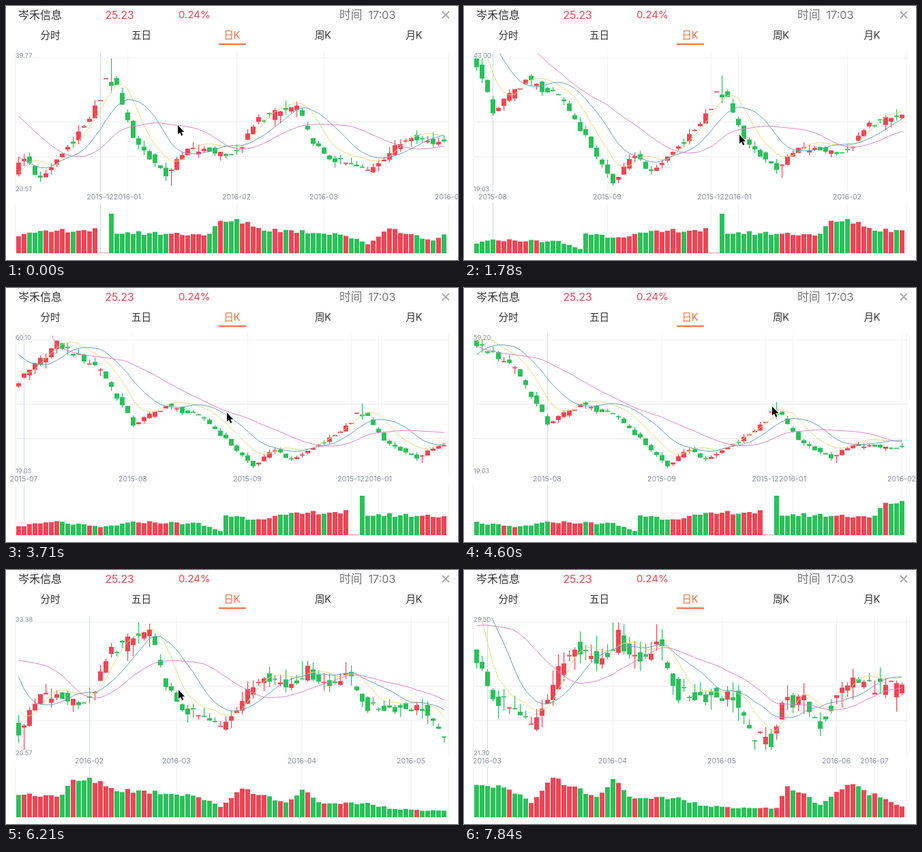
Animation of 663x373 px, one loop 8.43 s. Source, as an HTML page with a canvas:

```html
<!DOCTYPE html>
<html lang="zh">
<head>
<meta charset="utf-8">
<style>
  html, body { margin: 0; width: 663px; height: 373px; overflow: hidden; background: #fff; }
  canvas, svg { position: absolute; left: 0; top: 0; display: block; }
  text { font-family: Inter, "Noto Sans CJK SC", "Noto Sans CJK", sans-serif; fill: #333; }
  .tab { font-size: 14.5px; text-anchor: middle; }
  .quote { fill: #ee4655; }
  .time { fill: #777; }
</style>
</head>
<body>
<canvas id="chart" width="663" height="373"></canvas>
<svg width="663" height="373">
  <text x="18" y="18.5" font-size="16">岑禾信息</text>
  <text class="quote" x="145.5" y="18.5" font-size="15.7">25.23</text>
  <text class="quote" x="253" y="18" font-size="15">0.24%</text>
  <text class="time" x="489" y="18.5" font-size="16.8">时间</text>
  <text class="time" x="531.5" y="18.5" font-size="16.2">17:03</text>
  <path d="M640 8l10 10m0-10l-10 10" stroke="#aaa" stroke-width="1.8" fill="none"/>
  <text class="tab" x="65" y="47.5">分时</text>
  <text class="tab" x="198.5" y="47.5">五日</text>
  <text class="tab" x="331.5" y="47.5" style="fill:#f2703f">日K</text>
  <text class="tab" x="465" y="47.5">周K</text>
  <text class="tab" x="598.5" y="47.5">月K</text>
  <rect x="312" y="55" width="40" height="2" fill="#f2703f"/>
</svg>
<script>
const ctx = document.getElementById('chart').getContext('2d');
const LOOP = 8430, TICK = 148, COUNT = 196, VISIBLE = 79, FIRST_DAY = 63;
const PITCH = 8, FIRST_X = 18, LEFT = 14, RIGHT = 649;
const PRICE = { top: 67, high: 77, low: 264, bottom: 273 };
const VOLUME = { top: 289, height: 58, bottom: 363 };
const RED = '#ee4655', GREEN = '#2bc05a';
const AVERAGES = [[5, '#e5dc7c'], [10, '#66a2bd'], [20, '#d887c8']];
const AVERAGE_LIFT = 9;

const MONTHS = {
  18: '2015-07', 38: '2015-08', 59: '2015-09', 78: '2015-12', 83: '2016-01', 103: '2016-02',
  119: '2016-03', 142: '2016-04', 162: '2016-05', 183: '2016-06', 190: '2016-07'
};

// Turning points of the price and of the traded volume, by day
const PRICE_TREND = [
  [-20, 121], [-6, 123], [-4, 146], [4, 139], [5, 71], [16, 45], [24, 59], [32, 51], [38, 33],
  [44, 39], [51, 35], [60, 19.5], [64, 25], [67, 21.4], [74, 28.5], [78, 33.5], [79, 36.8],
  [81, 35.7], [84, 27.5], [90, 22.3], [94, 26], [103, 25.4], [107, 30.6], [114, 32.5],
  [116, 28.6], [119, 25], [127, 22.9], [135, 28.3], [139, 27], [143, 28.5], [147, 27],
  [150, 28.4], [154, 24.8], [164, 24.8], [167, 22.3], [171, 21.8], [173, 24.4], [177, 24.4],
  [180, 22.9], [185, 25.7], [195, 25.2]
];
const VOLUME_TREND = [
  [0, 5], [16, 5], [17, 15], [24, 22], [32, 13], [39, 22], [50, 19], [54, 7], [55, 33], [60, 27],
  [72, 38], [79, 38], [80, 61], [81, 34], [98, 31], [100, 52], [105, 52], [107, 40], [122, 32],
  [127, 15], [131, 42], [139, 20], [142, 40], [146, 18], [154, 20], [159, 11], [172, 9],
  [174, 33], [180, 13], [185, 34], [195, 12]
];
// Peaks and lows that set the price axis
const EXTREMES = [
  [0, 156.5], [25, 59.2], [35, 43], [60, 19.03], [80, 39.77],
  [91, 20.57], [114, 33.25], [142, 29.5], [171, 21.3]
];
// Days that open at the daily limit and hardly trade
const LIMIT_DAYS = [78, 79];

// Tick, x, y and whether the chart is dragged on the way there
const POINTER = [
  [0, 252, 175], [4, 168, 172], [5, 168, 172], [6, 180, 174], [12, 404, 189, true],
  [14, 460, 190, true], [16, 233, 186], [20, 457, 188, true], [21, 457, 188],
  [27, 257, 180, true], [31, 452, 174], [36, 172, 176, true], [38, 412, 174],
  [41, 172, 176, true], [44, 415, 175], [47, 263, 177, true], [49, 199, 184, true],
  [52, 230, 352], [53, 240, 400]
];

const mix = (a, b, k) => a + (b - a) * k;
const clamp = (v, lo, hi) => Math.max(lo, Math.min(hi, v));

function noise(i, salt) {
  const v = Math.sin(i * 12.9898 + salt * 78.233) * 43758.5453;
  return v - Math.floor(v);
}
const jitter = (i, salt, amount) => 1 + (noise(i, salt) * 2 - 1) * amount;

function along(points, at) {
  const next = points.findIndex(p => p[0] > at);
  if (next < 0) return points[points.length - 1][1];
  const [x0, y0] = points[next - 1], [x1, y1] = points[next];
  return mix(y0, y1, (at - x0) / (x1 - x0));
}

function makeDay(i) {
  const trend = along(PRICE_TREND, i);
  if (LIMIT_DAYS.includes(i)) return { open: trend, close: trend, high: trend, low: trend, volume: 0.6 };
  const change = clamp(trend / along(PRICE_TREND, i - 1) - 1, -0.1, 0.1);
  const close = trend * jitter(i, 1, 0.02);
  const open = trend / (1 + change * 0.8) * jitter(i, 2, 0.025);
  const high = Math.max(open, close) * (1 + noise(i, 3) ** 2 * 0.04);
  const low = Math.min(open, close) * (1 - noise(i, 4) ** 2 * 0.04);
  return { open, close, high, low, volume: along(VOLUME_TREND, i) * jitter(i, 5, 0.1) };
}

function makeDays() {
  const days = Array.from({ length: COUNT }, (_, i) => makeDay(i));
  for (const [at, price] of EXTREMES) {
    const peak = price > days[at].close;
    const limit = peak ? Math.min : Math.max;
    for (const d of days.slice(peak ? at : at - 25, at + 25)) {
      for (const key of ['open', 'close', 'high', 'low']) d[key] = limit(d[key], price);
    }
    days[at][peak ? 'high' : 'low'] = price;
  }
  return days;
}

const days = makeDays();

function average(i, span) {
  let sum = 0;
  for (let j = i - span + 1; j <= i; j++) sum += j < 0 ? along(PRICE_TREND, j) : days[j].close;
  return sum / span;
}

function poseAt(tick) {
  const pose = { x: POINTER[0][1], y: POINTER[0][2], start: FIRST_DAY };
  for (let i = 1; i < POINTER.length; i++) {
    const [t0, x0, y0] = POINTER[i - 1], [t1, x1, y1, dragged] = POINTER[i];
    if (tick <= t0) break;
    const k = Math.min(1, (tick - t0) / (t1 - t0));
    pose.x = mix(x0, x1, k);
    pose.y = mix(y0, y1, k);
    if (dragged) pose.start -= (pose.x - x0) / PITCH;
  }
  pose.start = clamp(Math.round(pose.start), 0, COUNT - VISIBLE);
  return pose;
}

function rect(color, x, y, w, h) {
  ctx.fillStyle = color;
  ctx.fillRect(x, y, w, h);
}

function label(text, x, y, size, align) {
  ctx.font = `${size}px Inter, sans-serif`;
  ctx.textAlign = align;
  ctx.fillStyle = '#8790a0';
  ctx.fillText(text, x, y);
}

function drawGrid(start) {
  const faint = '#f1f2f5', line = '#e9ebef';
  rect(faint, LEFT, 76, RIGHT - LEFT, 1);
  for (const y of [170, 221]) rect(line, LEFT, y, RIGHT - LEFT, 1);
  rect(faint, LEFT, VOLUME.bottom, RIGHT - LEFT, 1);
  const column = (color, x) => {
    rect(color, x, PRICE.top, 1, PRICE.bottom - PRICE.top);
    rect(color, x, VOLUME.top, 1, VOLUME.bottom - VOLUME.top);
  };
  column(faint, LEFT - 1);
  column(faint, RIGHT);
  let first = true;
  for (const [day, name] of Object.entries(MONTHS)) {
    const x = FIRST_X + (day - start) * PITCH;
    if (x < FIRST_X) continue;
    if (x < RIGHT) column(first ? '#cfd9e3' : faint, x);
    label(name, x, 284, 10.6, 'center');
    first = false;
  }
}

function drawAverages(start, count, yOf) {
  ctx.save();
  ctx.beginPath();
  ctx.rect(LEFT, 70, RIGHT - LEFT, PRICE.bottom - 70);
  ctx.clip();
  ctx.lineWidth = 1;
  ctx.lineJoin = 'round';
  for (const [span, color] of AVERAGES) {
    ctx.strokeStyle = color;
    ctx.beginPath();
    for (let i = 0; i < count; i++) {
      ctx.lineTo(FIRST_X + 0.5 + i * PITCH, yOf(average(start + i, span)) - AVERAGE_LIFT);
    }
    ctx.stroke();
  }
  ctx.restore();
}

function drawChart(start) {
  const range = days.slice(start, start + VISIBLE + 2);
  const max = Math.max(...range.map(d => d.high));
  const min = Math.min(...range.map(d => d.low));
  const peak = Math.max(...range.map(d => d.volume));
  const yOf = price => mix(PRICE.low, PRICE.high, (price - min) / (max - min));

  drawGrid(start);
  range.slice(0, VISIBLE).forEach((d, i) => {
    const x = FIRST_X + i * PITCH;
    const color = d.close >= d.open ? RED : GREEN;
    const top = yOf(Math.max(d.open, d.close)), bottom = yOf(Math.min(d.open, d.close));
    rect(color, x - 3, top, 7, Math.max(1.6, bottom - top));
    rect(color, x, yOf(d.high), 1.2, yOf(d.low) - yOf(d.high));
    const h = d.volume / peak * VOLUME.height;
    rect(color, x - 3, VOLUME.bottom - h, 7, h);
  });
  drawAverages(start, VISIBLE, yOf);
  label(max.toFixed(2), 14, 76, 9.3, 'left');
  label(min.toFixed(2), 14, 272, 9.3, 'left');
}

const arrow = new Path2D('M0 0V15L3.5 12L6 17.5L8.4 16.4L6 11H10.5Z');

function drawPointer(x, y) {
  ctx.save();
  ctx.translate(x, y);
  ctx.scale(0.88, 0.88);
  ctx.strokeStyle = '#fff';
  ctx.lineWidth = 2;
  ctx.stroke(arrow);
  ctx.fillStyle = '#000';
  ctx.fill(arrow);
  ctx.restore();
}

function render(now) {
  const { x, y, start } = poseAt(Math.floor((now % LOOP + 8) / TICK));
  rect('#fff', 0, 0, 663, 373);
  drawChart(start);
  drawPointer(Math.round(x), Math.round(y));
}

const begin = performance.now();
function loop() {
  render(performance.now() - begin);
  requestAnimationFrame(loop);
}
loop();
</script>
</body>
</html>
```
